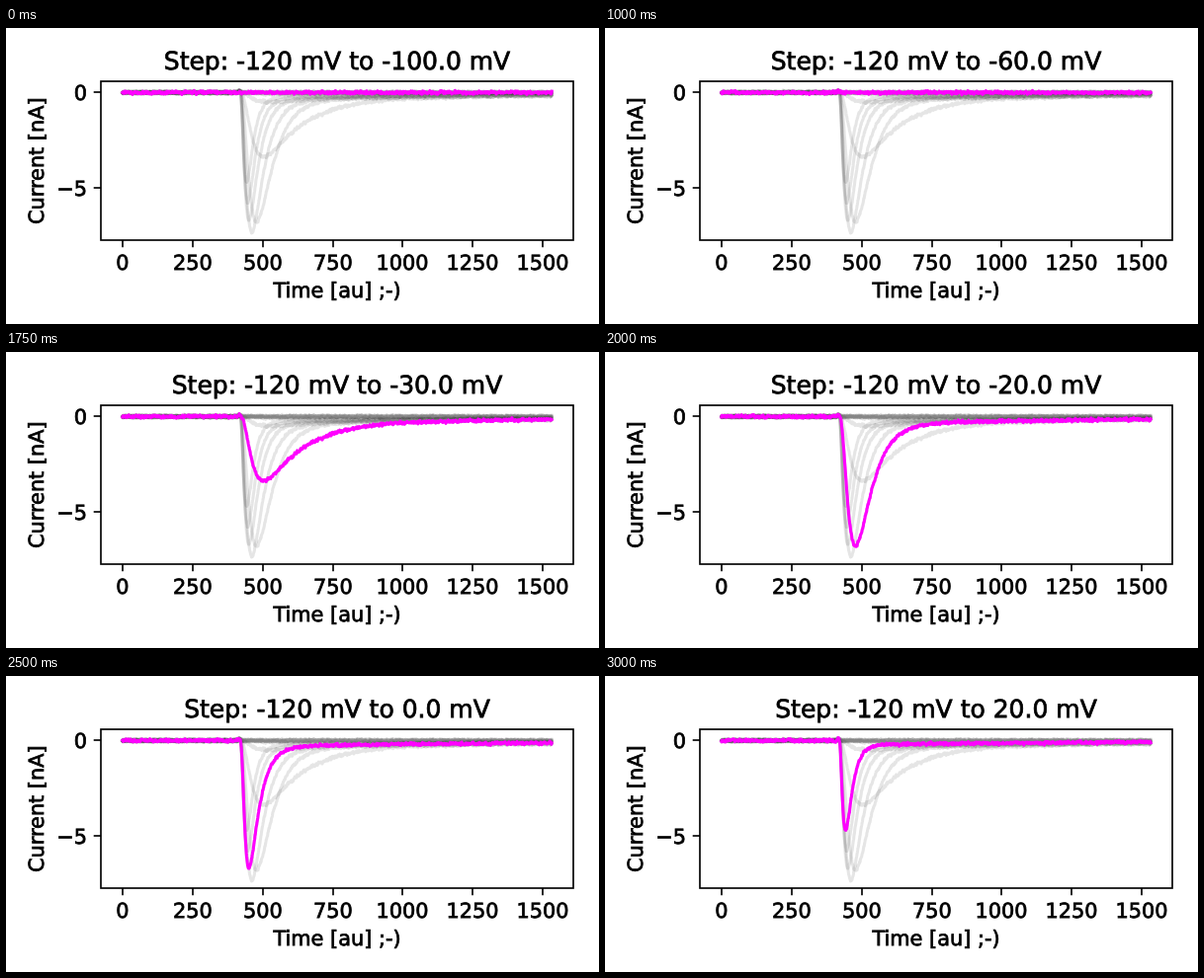
Write an HTML page that moves like this. It is 600 by 300 pixels and loops after 3250 ms.

```html
<!DOCTYPE html>
<html lang="en">
<head>
<meta charset="utf-8">
<title>Voltage steps</title>
<style>
  html, body { margin: 0; width: 100%; height: 100%; overflow: hidden; background: #fff; }
  svg { display: block; width: 600px; height: 300px; }
  text {
    font: 20.83px "DejaVu Sans", sans-serif;
    text-anchor: middle;
    text-rendering: geometricPrecision;
    stroke: #000;
    stroke-width: .75px;
  }
  #title { font-size: 25px; }
  .end { text-anchor: end; }
  .axes { fill: none; stroke: #000; stroke-width: 1.67; }
  .trace { fill: none; stroke-width: 3.1; stroke-linejoin: round; stroke-linecap: square; }
  #sweeps { stroke: #000; stroke-opacity: .1; }
  #active { stroke: #f0f; }
</style>
</head>
<body>
<svg viewBox="0 0 600 300">
  <g id="sweeps"></g>
  <path id="active" class="trace"/>
  <g id="axes">
    <rect class="axes" x="96" y="54" width="478" height="161"/>
  </g>
  <text id="title" x="335" y="42"></text>
  <text x="335" y="273">Time [au] ;-)</text>
  <text transform="translate(38 134.7) rotate(-90)">Current [nA]</text>
</svg>
<script>
const STEP_MS = 250, STEPS = 13;
const X0 = 117.8, X1 = 552.2, Y0 = 65.4, SAMPLES = 1533, ONSET = 236.8;

// Per voltage: peak depth, activation tau, decay tau, slow part (px)
const KINETICS = {
  "-50": [1.6, 14, 100, 1],
  "-40": [9.8, 9, 50, 5],
  "-30": [65, 8.8, 38, 8],
  "-20": [131, 9, 15.5, 8],
  "-10": [141.5, 5.8, 12.3, 8],
  "0": [129, 4.3, 10, 6.5],
  "10": [111, 3.8, 8.2, 5.5],
  "20": [91.5, 3.4, 6.5, 4.5]
};

const byId = id => document.getElementById(id);

function add(parent, tag, attrs, text = "") {
  const el = document.createElementNS("http://www.w3.org/2000/svg", tag);
  for (const key in attrs) el.setAttribute(key, attrs[key]);
  el.textContent = text;
  parent.append(el);
  return el;
}

function random(seed) {
  return () => {
    seed = (seed + 0x6D2B79F5) | 0;
    let t = Math.imul(seed ^ (seed >>> 15), seed | 1);
    t ^= t + Math.imul(t ^ (t >>> 7), t | 61);
    return ((t ^ (t >>> 14)) >>> 0) / 4294967296;
  };
}

function currentAt(volts) {
  const k = KINETICS[volts];
  if (!k) return () => 0;
  const [peak, rise, decay, slow] = k;
  const gate = t => (1 - Math.exp(-t / rise)) ** 3;
  const fast = t => gate(t) * Math.exp(-t / decay);
  const late = t => slow * gate(t) * Math.exp(-t / 320);
  const top = rise * Math.log(1 + 3 * decay / rise);
  const gain = (peak - late(top)) / fast(top);
  return t => t > 0 ? gain * fast(t) + late(t) : 0;
}

function tracePath(volts, seed) {
  const rand = random(seed), current = currentAt(volts);
  const blip = (volts + 120) / 60;
  const points = [];
  let noise = 0;
  for (let i = 0; i < SAMPLES; i++) {
    const x = X0 + (X1 - X0) * i / (SAMPLES - 1);
    const t = x - ONSET;
    noise = noise * .5 + (rand() + rand() + rand() - 1.5) * 1.2;
    const spike = blip * Math.exp(-(((t + .8) / 1.2) ** 2));
    points.push(x.toFixed(2) + " " + (Y0 + current(t) + noise - spike).toFixed(2));
  }
  return "M" + points.join("L");
}

for (let i = 0; i < 7; i++) {
  const x = Math.round(117.97 + 70.85 * i);
  add(byId("axes"), "path", { class: "axes", d: `M${x} 215v7.3` });
  add(byId("axes"), "text", { x, y: 244.5 }, i * 250);
}
for (const [y, label] of [[65, "0"], [162, "\u22125"]]) {
  add(byId("axes"), "path", { class: "axes", d: `M96 ${y}h-7.3` });
  add(byId("axes"), "text", { class: "end", x: 82, y: y + 8 }, label);
}

const sweeps = Array.from({ length: STEPS }, (_, i) => {
  const volts = -100 + 10 * i;
  const d = tracePath(volts, 71 + 13 * i);
  add(byId("sweeps"), "path", { class: "trace", d });
  return { d, title: `Step: -120 mV to ${volts.toFixed(1)} mV` };
});

let shown = -1;
function show(step) {
  if (step === shown) return;
  shown = step;
  byId("active").setAttribute("d", sweeps[step].d);
  byId("title").textContent = sweeps[step].title;
}

const start = performance.now();
function tick() {
  const elapsed = performance.now() - start;
  show(Math.floor(elapsed / STEP_MS) % STEPS);
  requestAnimationFrame(tick);
}
tick();
</script>
</body>
</html>
```
